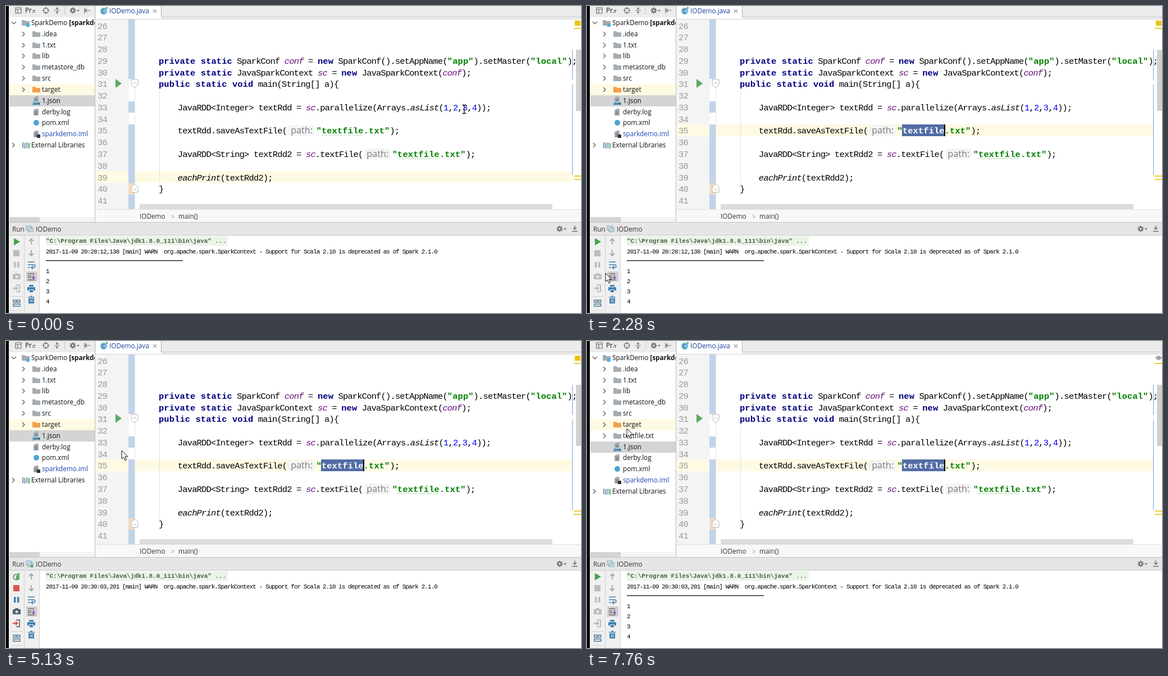
These frames come from a looping animation (1024 px wide and 547 px high, 8000 ms). An HTML page with a canvas:

```html
<!DOCTYPE html>
<html lang="en">
<head>
<meta charset="utf-8">
<title>Spark IO demo</title>
<style>
  html, body { margin: 0; width: 100%; height: 100%; overflow: hidden; background: #fff; }
  canvas { display: block; }
</style>
</head>
<body>
<canvas id="stage" width="1024" height="547"></canvas>
<script>
const ctx = document.getElementById('stage').getContext('2d');
const LOOP = 8000, PITCH = 8.45, BOLD_PITCH = 9.35;
const UI = '11.75px "Open Sans", "Noto Sans", sans-serif';
const MONO = '"Liberation Mono", "DejaVu Sans Mono", monospace';
const GREY = '#a5a5a5', DARK = '#6e6e6e', BLUE = '#3f7fb0', CARET_ROW = '#fffae3';

function rect(x, y, w, h, color) {
  ctx.fillStyle = color;
  ctx.fillRect(x, y, w, h);
}

// SVG path data relative to (x, y)
function shape(x, y, d, fill, stroke, width = 1) {
  const path = new Path2D(d);
  ctx.save();
  ctx.translate(x, y);
  if (fill) { ctx.fillStyle = fill; ctx.fill(path); }
  if (stroke) { ctx.strokeStyle = stroke; ctx.lineWidth = width; ctx.stroke(path); }
  ctx.restore();
}

function circle(x, y, r, fill, stroke, width) {
  shape(x, y, `M${-r} 0a${r} ${r} 0 1 0 ${2 * r} 0a${r} ${r} 0 1 0 ${-2 * r} 0`, fill, stroke, width);
}

function label(text, x, y, color = '#111', font = UI) {
  ctx.font = font;
  ctx.fillStyle = color;
  ctx.fillText(text, x, y);
  return x + ctx.measureText(text).width;
}

// Monospaced text on a fixed character grid
function mono(text, x, y, color, size, pitch, style = '') {
  ctx.font = `${style} ${size}px ${MONO}`;
  ctx.letterSpacing = '0px';
  ctx.letterSpacing = pitch - ctx.measureText('0').width + 'px';
  ctx.fillStyle = color;
  ctx.fillText(text, x, y);
  ctx.letterSpacing = '0px';
  return x + text.length * pitch;
}

const STYLES = {
  n: ['#000', ''], i: ['#000', 'italic'], f: ['#660e7a', 'italic'],
  k: ['#000080', 'bold'], s: ['#008000', 'bold'], d: ['#0000ff', '']
};

// Each piece is a style letter, a colon and the text; "h:" is a parameter hint
const CODE = {
  29: ['k:private static', 'n: SparkConf ', 'f:conf', 'n: = ', 'k:new', 'n: SparkConf().setAppName(',
       's:"app"', 'n:).setMaster(', 's:"local"', 'n:);'],
  30: ['k:private static', 'n: JavaSparkContext ', 'f:sc', 'n: = ', 'k:new', 'n: JavaSparkContext(', 'f:conf', 'n:);'],
  31: ['k:public static void', 'n: main(String[] a){'],
  33: ['n:    JavaRDD<Integer> textRdd = ', 'f:sc', 'n:.parallelize(Arrays.', 'i:asList', 'n:(',
       'd:1', 'n:,', 'd:2', 'n:,', 'd:3', 'n:,', 'd:4', 'n:));'],
  35: ['n:    textRdd.saveAsTextFile(', 'h:path:', 's:"textfile.txt"', 'n:);'],
  37: ['n:    JavaRDD<String> textRdd2 = ', 'f:sc', 'n:.textFile(', 'h:path:', 's:"textfile.txt"', 'n:);'],
  39: ['n:    ', 'i:eachPrint', 'n:(textRdd2);'],
  40: ['n:}']
};

const rowY = n => 35.5 + (n - 26) * 20.77;
const rowTop = n => Math.round(rowY(n) - 11.3);

function hint(text, x, y) {
  ctx.fillStyle = '#f4f4f4';
  ctx.beginPath();
  ctx.roundRect(x + 3, y - 10, 46, 19, 3);
  ctx.fill();
  label(text, x + 7, y + 5, '#7b7b7b', '16.2px "Open Sans", "Noto Sans", sans-serif');
  return x + 52.4;
}

function codeLine(n, selected) {
  const y = rowY(n);
  let x = 272;
  for (const piece of CODE[n]) {
    const kind = piece[0], text = piece.slice(2);
    if (kind === 'h') { x = hint(text, x, y); continue; }
    const [color, style] = STYLES[kind];
    const start = x;
    x = mono(text, x, y + 5, color, 15.5, kind === 'k' || kind === 's' ? BOLD_PITCH : PITCH, style);
    if (!text.startsWith('"textfile')) continue;
    const wordX = start + BOLD_PITCH;
    if (selected) {
      rect(561, rowTop(n), 76, 21, '#526da5');
      mono('textfile', wordX, y + 5, '#fff', 15.5, BOLD_PITCH, 'bold');
      rect(636, rowTop(n), 2, 21, '#000');
    } else {
      shape(wordX, y + 8, 'M0 0' + 'q1 -2 2 0t2 0'.repeat(18), null, '#9fd09f', 0.8);
    }
  }
}

function gear(x, y) {
  for (let i = 0; i < 8; i++) {
    const a = i * Math.PI / 4;
    shape(x, y, `M0 0L${5.5 * Math.cos(a)} ${5.5 * Math.sin(a)}`, null, DARK, 1.8);
  }
  circle(x, y, 2.8, '#eee', DARK, 2);
  shape(x + 7, y - 1, 'M0 0h5l-2.5 3z', DARK);
}

const folder = (x, y, color) => shape(x, y, 'M-7 -5h5l2 2h7v8h-14z', color);

function sheet(x, y) {
  shape(x, y, 'M-2 -6h6v12h-9v-9z', '#a9b0b6');
  shape(x, y, 'M-3 -1h5M-3 1.5h5M-3 4h5', null, '#59636b');
}

function treeIcon(kind, x, y) {
  if (kind === 'folder') folder(x, y, '#a5adb3');
  if (kind === 'target') folder(x, y, '#f3a04b');
  if (kind === 'project') { folder(x, y, '#a5adb3'); rect(x + 1, y + 1, 6, 6, '#52aee0'); }
  if (kind === 'log') sheet(x, y);
  if (kind === 'dot') circle(x, y, 5, '#4aa3d8');
  if (kind === 'module') { sheet(x, y); rect(x + 1, y + 1, 6, 6, '#333'); }
  if (kind === 'json') {
    sheet(x, y - 2);
    rect(x - 7, y + 1, 14, 7, '#9fd4ec');
    label('JSON', x - 6, y + 7, '#123', 'bold 5px "Open Sans", sans-serif');
  }
  if (kind === 'libs') {
    ['#8b959c', '#8b959c', '#52aee0', '#6aaf50'].forEach((c, i) => rect(x - 6 + i * 3.6, y - 5 + i % 2, 2.2, 10, c));
  }
}

function tree(t) {
  const rows = [
    ['project', 'SparkDemo', 0], ['folder', '.idea', 1], ['folder', '1.txt', 1], ['folder', 'lib', 1],
    ['folder', 'metastore_db', 1], ['folder', 'src', 1], ['target', 'target', 1],
    ['json', '1.json', 1], ['log', 'derby.log', 1], ['dot', 'pom.xml', 1],
    ['module', 'sparkdemo.iml', 1], ['libs', 'External Libraries', 0]
  ];
  if (t >= 7500) rows.splice(7, 0, ['folder', 'textfile.txt', 1]);
  ctx.save();
  ctx.beginPath();
  ctx.rect(6, 20, 152, 356);
  ctx.clip();
  rows.forEach(([kind, name, depth], i) => {
    const y = Math.round(30 + i * 19.83), x = depth ? 64 : 45;
    if (kind === 'target') rect(6, y - 10, 152, 20, CARET_ROW);
    if (kind === 'json') rect(6, y - 10, 152, 20, '#d4d4d4');
    if (/folder|target/.test(kind)) shape(31, y, 'M-2 -4l4 4l-4 4', null, '#555', 1.2);
    if (kind === 'project') shape(14, y, 'M-4 -2l4 4l4 -4', null, '#555', 1.2);
    if (kind === 'libs') shape(13, y, 'M-2 -4l4 4l-4 4', null, '#555', 1.2);
    treeIcon(kind, x - 10, y);
    const end = label(name, x, y + 4, kind === 'module' ? '#1d46b4' : '#111');
    if (kind === 'project') label('[sparkdemo]', end + 3, y + 4, '#111', 'bold ' + UI);
  });
  ctx.restore();
}

function topBar() {
  rect(5, 0, 153, 20, '#ececec');
  rect(159, 0, 865, 23, '#ececec');
  shape(22, 8, 'M-5 -5h10v10h-10zM-5 -2h10M-1 -2v7', null, DARK, 1.2);
  label('Pr..', 34, 12);
  shape(50, 7, 'M-3 0h6l-3 3z', DARK);
  circle(71, 8, 4.5, null, DARK, 1.3);
  shape(71, 8, 'M-6 0h4M2 0h4M0 -6v4M0 2v4', null, DARK, 1.2);
  shape(91, 8, 'M-5 0h10M0 -6v4M0 2v4M-2 -4l2 2l2 -2M-2 4l2 -2l2 2', null, DARK, 1.1);
  rect(104, 1, 1, 14, '#c8c8c8');
  gear(119, 8);
  shape(145, 8, 'M-5 -5v10M-4 0h9M-1 -3l-3 3l3 3', null, DARK, 1.2);
  rect(160, 0, 117, 23, '#fff');
  rect(276, 0, 1, 20, '#aaa');
  rect(276, 19, 748, 1, '#c4c4c4');
  rect(159, 23, 865, 1, '#d4d4d4');
  circle(174, 9, 6.3, '#7fbfe0');
  label('C', 170.3, 13, '#24485c', '10.5px "Open Sans", sans-serif');
  shape(178, 3, 'M0 -2l4 2.5l-4 2.5z', '#5aa55f');
  label('IODemo.java', 184, 13, '#1b3f9c');
  shape(265, 9, 'M-3 -3l6 6M3 -3l-6 6', null, '#999', 1.1);
}

function editor(t) {
  const clicked = t >= 560, selected = t >= 1800;
  const active = selected ? 35 : clicked ? 33 : 39;
  rect(159, 24, 60, 338, '#f4f4f4');
  rect(159, rowTop(active), 849, 21, CARET_ROW);
  for (let n = 26; n <= 41; n++) mono(String(n), 163, rowY(n) + 5, '#999', 15.5, PITCH);

  for (const [y, h] of [[24, 106], [170, 20], [211, 105], [336, 26]]) rect(218, y, 11, h, '#c1d3ea');
  rect(218, 316, 11, 20, '#f5dcc0');
  rect(229, 24, 1, 338, '#e6e6e6');
  rect(273, 150, 1, 166, '#e3e3e3');
  shape(229, 139, 'M-6 -8h12v9l-6 6l-6 -6zM-3 -2h6', '#fff', '#b5b5b5');
  shape(229, 325, 'M-6 7h12v-9l-6 -6l-6 6zM-3 2h6', '#fff', '#b5b5b5');
  shape(195, 138, 'M0 -8l11 8l-11 8z', '#59a869');

  if (clicked && !selected) {
    rect(773, rowTop(33), 8, 21, '#a3cfff');
    rect(841, rowTop(33), 8, 21, '#a3cfff');
  }
  for (const n in CODE) codeLine(+n, selected && n === '35');
  if (clicked && !selected) rect(848, rowTop(33), 2, 21, '#000');

  if (t >= 7500) {
    shape(1018, 30, 'M-5 0q5 -6 10 0q-5 6 -10 0', '#fff', '#777', 1.2);
    circle(1018, 30, 2, '#777');
  } else rect(1013, 26, 10, 9, '#eac50e');
  rect(1015, 78, 9, 109, '#d0d0d0');
  rect(1008, 78, 1.5, 54, '#9bbbe4');
  rect(1008, 140, 1.5, 161, '#9bbbe4');
  for (const y of [39, 302, 308]) rect(1011, y, 13, 2, '#e8cf36');

  rect(238, 353, 735, 9, '#dcdcdc');
  rect(159, 363, 865, 22, '#f8f8f8');
  rect(159, 362, 865, 1, '#dedede');
  label('IODemo', 238, 379, '#333');
  shape(297, 375, 'M-1.5 -3l3 3l-3 3', null, '#777');
  label('main()', 307, 379, '#333');
}

function tooltip() {
  shape(525, 240, 'M0 0h106l6 -8l7 8h106v24h-225z', '#fdfcd6', '#8c8c7c');
  const x = label("Typo: In word 'textfile' ", 530, 256);
  const end = label('more...', x, 256, '#0000e0');
  rect(x, 257.5, end - x, 1, '#0000e0');
  label(' (Ctrl+F1)', end, 256);
}

function runIcons(t) {
  const running = t >= 3640 && t < 7260;
  const tint = color => running ? color : '#bcbcbc';
  if (running) {
    shape(18, 420, 'M4 4.5a5.5 5 0 1 1 0 -8M5 -7v5h-5', null, '#4a9c56', 1.7);
    rect(18, 419, 6, 6, '#59a869');
  } else shape(14, 420, 'M0 -6.5l11 6.5l-11 6.5z', t >= 3360 && t < 3640 ? '#b5b5b5' : '#45a24f');
  rect(13, 435, 11, 11, tint('#d9574c'));
  rect(14, 456, 3.5, 10, tint(BLUE));
  rect(20, 456, 3.5, 10, tint(BLUE));
  const camera = tint('#59636b');
  shape(19, 482, 'M-7 -4h3l2 -2h4l2 2h3v9h-14z', camera);
  circle(19, 482.5, 2.8, '#eee', tint('#367'), 1);
  shape(19, 503, 'M-1 -6h6v12h-6', null, tint('#777'), 2);
  shape(19, 503, 'M-7 -1.2h5v-3l5 4.2l-5 4.2v-3h-5z', tint('#d9574c'));
  rect(9, 517, 20, 1, '#d0d0d0');
  shape(19, 529, 'M-6 -5h5v4h-5zM1 -5h5v4h-5zM-6 2h12v4h-12z', '#d8ecf7', '#56788e', 1.4);
  rect(9, 542, 20, 1, '#d0d0d0');

  shape(45, 420, 'M0 5v-9M-4 -1l4 -4l4 4', null, GREY, 1.8);
  shape(45, 440, 'M0 -5v9M-4 1l4 4l4 -4', null, GREY, 1.8);
  shape(45, 461, 'M-6 -5h12M-6 0h10q3 0 3 2.5t-3 2.5h-3M3 2l-3 3l3 3M-6 5h4', null, BLUE, 1.4);
  rect(36, 473, 20, 18, '#cfcfcf');
  shape(45, 482, 'M-6 -5h11M-6 -1h6M-6 2h6M-6 6h12', null, DARK, 1.3);
  shape(45, 482, 'M4 -3v6M1.5 1l2.5 3l2.5 -3', null, '#914cc4', 1.6);
  shape(45, 503, 'M-4 -6h8v3h-8zM-7 -2h14v6h-3v-2h-8v2h-3zM-3 3h6v4h-6z', BLUE);
  shape(45, 524, 'M-6 -5h12M-2 -7h4', null, BLUE, 1.6);
  shape(45, 524, 'M-5 -3h10v9h-10z', BLUE);
  shape(45, 524, 'M-2 -1v5M0 -1v5M2 -1v5', null, '#d8ecf7', 0.9);

  shape(41, 397, 'M-5 -5h9v7h-9zM-2 -2h9v7h-9z', '#d8ecf7', '#7b97a8');
  if (running) circle(46, 401, 2.6, '#4db04f');
}

function consoleText(t) {
  const line = (text, row) => mono(text, 71, 440.5 + (row - 1) * 17.9, '#000', 11, 5.667);
  rect(71, 410, 324, 17, '#e9f5e6');
  mono('"C:\\Program Files\\Java\\jdk1.8.0_111\\bin\\java" ...', 71, 422, '#4f5b4f', 11, 6.55, 'bold');
  const cleared = t >= 3640;
  if (!cleared || t >= 4450) {
    const stamp = cleared ? '20:30:03,201' : '20:28:12,138';
    line(`2017-11-09 ${stamp} [main] WARN  org.apache.spark.SparkContext - Support for Scala 2.10 is deprecated as of Spark 2.1.0`, 1);
  }
  if (!cleared || t >= 6990) {
    rect(71, 453, 244, 1.3, '#111');
    for (let i = 1; i <= 4; i++) line(String(i), i + 2);
  }
}

function runPanel(t) {
  rect(5, 385, 1019, 1, '#c4c4c4');
  rect(5, 386, 1019, 22, '#e6e6e6');
  rect(5, 408, 1019, 1, '#c8c8c8');
  rect(5, 409, 55, 138, '#f0f0f0');
  rect(32, 409, 1, 138, '#d0d0d0');
  rect(59, 409, 1, 138, '#d0d0d0');
  label('Run', 11, 402, '#333');
  label('IODemo', 53, 402, '#333');
  gear(986, 397);
  shape(1013, 397, 'M0 -6v7M-3 -2l3 3l3 -3M-5 4.5h10', null, DARK, 1.4);
  runIcons(t);
  consoleText(t);
}

// time, x, y
const MOUSE = [
  [0, 816, 184], [140, 816, 184], [540, 852, 183], [820, 855, 186], [1080, 855, 186],
  [1400, 621, 224], [1750, 621, 224], [1890, 590, 240], [2025, 28, 500], [2140, 33, 476],
  [2420, 33, 476], [2970, 22, 432], [3200, 18, 420], [4030, 18, 420], [4590, 300, 330],
  [4990, 530, 208], [5120, 206, 195], [5260, 206, 195], [5670, 75, 150], [5900, 60, 139],
  [6075, 68, 143], [6210, 71, 156], [LOOP, 71, 156]
];

function pointer(t) {
  t = Math.floor(t / 135) * 135;
  const i = MOUSE.findIndex(key => key[0] > t);
  const [t0, x0, y0] = MOUSE[i - 1], [t1, x1, y1] = MOUSE[i];
  const p = (t - t0) / (t1 - t0);
  const x = x0 + (x1 - x0) * p, y = y0 + (y1 - y0) * p;
  if (x > 237 && y < 363) {
    shape(x, y, 'M-3.5 -7.5h2.5l1 1l1 -1h2.5M0 -6.5v13M-3.5 7.5h2.5l1 -1l1 1h2.5', null, '#111', 1.3);
  } else {
    shape(x, y, 'M0 0v15l3.5 -3.2l2.6 6l2.5 -1l-2.6 -5.8h4.7z', '#fff', '#111');
  }
}

function draw() {
  const t = performance.now() % LOOP;
  rect(0, 0, 1024, 547, '#fff');
  topBar();
  rect(6, 376, 152, 9, '#f4f4f4');
  rect(6, 376, 54, 9, '#d4d4d4');
  tree(t);
  editor(t);
  rect(158, 0, 1, 385, '#bdbdbd');
  runPanel(t);
  if (t >= 1380 && t < 1800) tooltip();
  rect(0, 0, 5, 547, '#000');
  pointer(t);
  requestAnimationFrame(draw);
}
draw();
</script>
</body>
</html>
```
